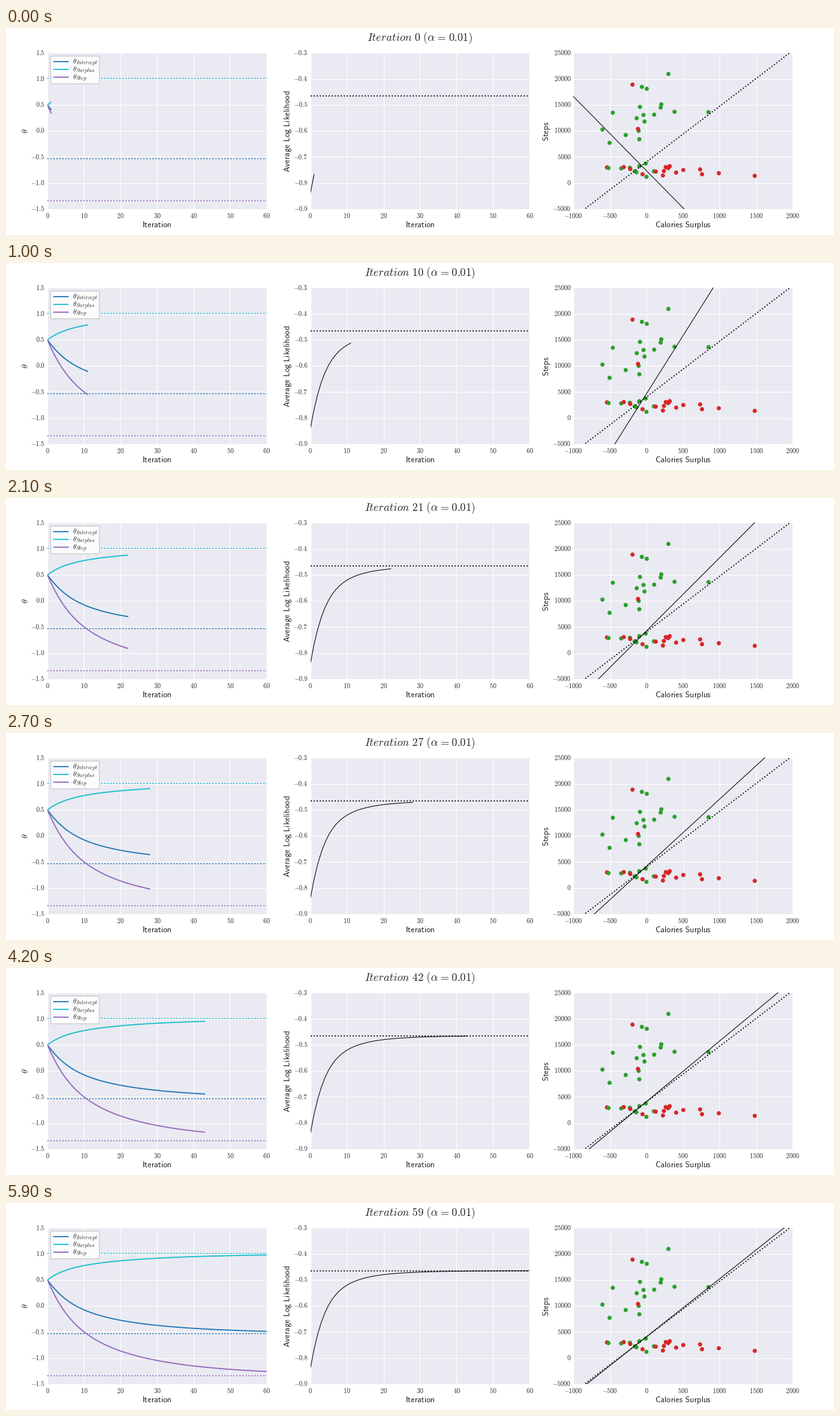
These frames come from a looping animation (1280 by 320 pixels, 6 s). A matplotlib script:

```python
import numpy as np
import matplotlib.pyplot as plt
from matplotlib.animation import FuncAnimation
from matplotlib.lines import Line2D
from matplotlib.patches import FancyBboxPatch
from matplotlib.transforms import Affine2D

W, H, DPI = 1280, 320, 80
PX = 72 / DPI  # points per pixel
STEPS, ALPHA = 60, 0.01
INK, PANEL = "0.15", "#eaeaf2"
BLUE, CYAN, PURPLE = "#1f77b4", "#17becf", "#9467bd"
GREEN, RED = "#2ca02c", "#d62728"
COLORS = (BLUE, CYAN, PURPLE)

# (calorie surplus, steps) for each day
RED_DAYS = [
    (-541, 3010), (-191, 18900), (-116, 10400), (-311, 3070), (-222, 2700),
    (-54, 1700), (127, 2200), (225, 1450), (238, 2320), (264, 3070),
    (306, 3050), (296, 2880), (318, 3250), (406, 2010), (504, 2510),
    (734, 2630), (760, 1700), (990, 1890), (1482, 1390),
]
GREEN_DAYS = [
    (300, 20950), (-63, 18470), (4, 18100), (203, 15120), (194, 14500),
    (-89, 14620), (-461, 13500), (-41, 13070), (105, 13130), (384, 13690),
    (849, 13620), (-134, 12450), (-27, 11820), (-603, 10270), (-107, 10020),
    (-284, 9220), (-98, 8410), (-505, 7730), (-519, 2880), (-346, 2820),
    (-227, 2940), (-98, 3250), (-10, 3750), (-160, 2260), (-138, 2070),
    (-1, 1200), (101, 2260),
]

# Logistic regression fitted by gradient ascent
days = np.array(RED_DAYS[:1] + GREEN_DAYS + RED_DAYS[1:], float)
y = np.array([1] + [0] * len(GREEN_DAYS) + [1] * (len(RED_DAYS) - 1))
mean, std = days.mean(axis=0), days.std(axis=0)
X = np.column_stack([np.ones(len(days)), (days - mean) / std])


def prob(theta):
    return 1 / (1 + np.exp(-X @ theta))


def avg_loglik(theta):
    p = prob(theta)
    return np.mean(np.where(y == 1, np.log(p), np.log(1 - p)))


def optimum():
    theta = np.zeros(3)
    for _ in range(25):
        p = prob(theta)
        hess = X.T @ (X * (p * (1 - p))[:, None])
        theta = theta + np.linalg.solve(hess, X.T @ (y - p))
    return theta


def boundary(theta, x):
    z = (x - mean[0]) / std[0]
    return mean[1] - std[1] * (theta[0] + theta[1] * z) / theta[2]


path = [np.full(3, 0.5)]
for _ in range(STEPS):
    path.append(path[-1] + ALPHA * X.T @ (y - prob(path[-1])))
path = np.array(path)
loglik = np.array([avg_loglik(t) for t in path])
best = optimum()

# Stage, with a transform for pixels counted from the top left
plt.rcParams["mathtext.fontset"] = "cm"
fig = plt.figure(figsize=(W / DPI, H / DPI), dpi=DPI, facecolor="white")
pixels = Affine2D().scale(1 / W, -1 / H).translate(0, 1) + fig.transFigure

TOP, BOTTOM, LEFT, RIGHT = 38.4, 280, 64, 1216
AX_W = (RIGHT - LEFT) / 3.4


def text(x, ypos, s, size, **kw):
    opts = dict(ha="center", va="baseline", color=INK, transform=pixels)
    return fig.text(x, ypos, f"${s}$", fontsize=size * PX, **{**opts, **kw})


def sans(s):
    return r"\mathsf{" + s.replace(" ", r"\ ") + "}"


def panel(col, xticks, yticks, fmt, xlabel, ylabel, ylabel_x):
    x0 = LEFT + 1.2 * AX_W * col
    ax = fig.add_axes([x0 / W, 1 - BOTTOM / H, AX_W / W, (BOTTOM - TOP) / H],
                      facecolor=PANEL)
    ax.set(xlim=(xticks[0], xticks[-1]), ylim=(yticks[0], yticks[-1]),
           xticks=xticks, yticks=yticks)
    ax.spines[:].set_visible(False)
    ax.tick_params(length=0, labelbottom=False, labelleft=False)
    ax.set_axisbelow(True)
    ax.grid(color="white", lw=PX, ls="-")
    for pos, v in zip(np.linspace(x0, x0 + AX_W, len(xticks)), xticks):
        text(pos, 293.5, f"{v:.0f}", 10)
    for pos, v in zip(np.linspace(BOTTOM, TOP, len(yticks)), yticks):
        text(x0 - 4, pos + 3.2, fmt.format(v), 10, ha="right")
    text(x0 + AX_W / 2, 308.3, sans(xlabel), 13)
    text(ylabel_x, (TOP + BOTTOM) / 2, ylabel, 13, rotation=90,
         rotation_mode="anchor")
    return ax


iters = np.arange(0, 61, 10)
ax_theta = panel(0, iters, np.linspace(-1.5, 1.5, 7), "{:.1f}",
                 "Iteration", r"\theta", 34.5)
ax_ll = panel(1, iters, np.linspace(-0.9, -0.3, 7), "{:.1f}",
              "Iteration", sans("Average Log Likelihood"), 439.5)
ax_days = panel(2, np.arange(-1000, 2001, 500), np.arange(-5000, 25001, 5000),
                "{:.0f}", "Calories Surplus", sans("Steps"), 839)

THICK, THIN = 1.75 * PX, PX
span = np.array([-1000, 2000])

curves = []
for value, color in zip(best, COLORS):
    ax_theta.plot([0, STEPS], [value, value], ":", color=color, lw=THICK)
    curves += ax_theta.plot([], [], color=color, lw=THICK)

ax_ll.plot([0, STEPS], [avg_loglik(best)] * 2, ":", color="black", lw=THICK)
ll_curve, = ax_ll.plot([], [], color="black", lw=THIN)

ax_days.scatter(*days.T, s=(6.5 * PX) ** 2, c=np.where(y == 1, RED, GREEN),
                linewidths=0, zorder=1.5)
ax_days.plot(span, boundary(best, span), ":", color="black", lw=THICK)
split, = ax_days.plot([], [], color="black", lw=THIN)

# Legend
fig.add_artist(FancyBboxPatch(
    (69, 43.4), 75.3, 42.8, boxstyle="round,pad=0,rounding_size=2",
    fc=(1, 1, 1, 0.9), ec="0.75", lw=PX, transform=pixels, zorder=1))
for row, (name, color) in enumerate(zip(("Intercept", "Surplus", "Step"), COLORS)):
    mid = 51.7 + 12 * row
    fig.add_artist(Line2D([73.5, 95.5], [mid, mid], color=color, lw=THICK,
                          transform=pixels, zorder=2))
    text(103, mid + 3.2, r"\theta", 10, ha="left")
    text(107.8, mid + 4.8, name, 8, ha="left")

title = text(639.5, 19.7, "", 17)


def update(i):
    n = np.arange(i + 2)
    for curve, values in zip(curves, path.T):
        curve.set_data(n, values[:i + 2])
    ll_curve.set_data(n, loglik[:i + 2])
    split.set_data(span, boundary(path[i], span))
    title.set_text(rf"$Iteration\ {i}\ (\alpha\hspace{{0.08}}="
                   rf"\hspace{{0.08}}{ALPHA})$")
    return [*curves, ll_curve, split, title]


anim = FuncAnimation(fig, update, frames=STEPS, interval=100, repeat=True,
                     repeat_delay=0, blit=False)
plt.show()
```
